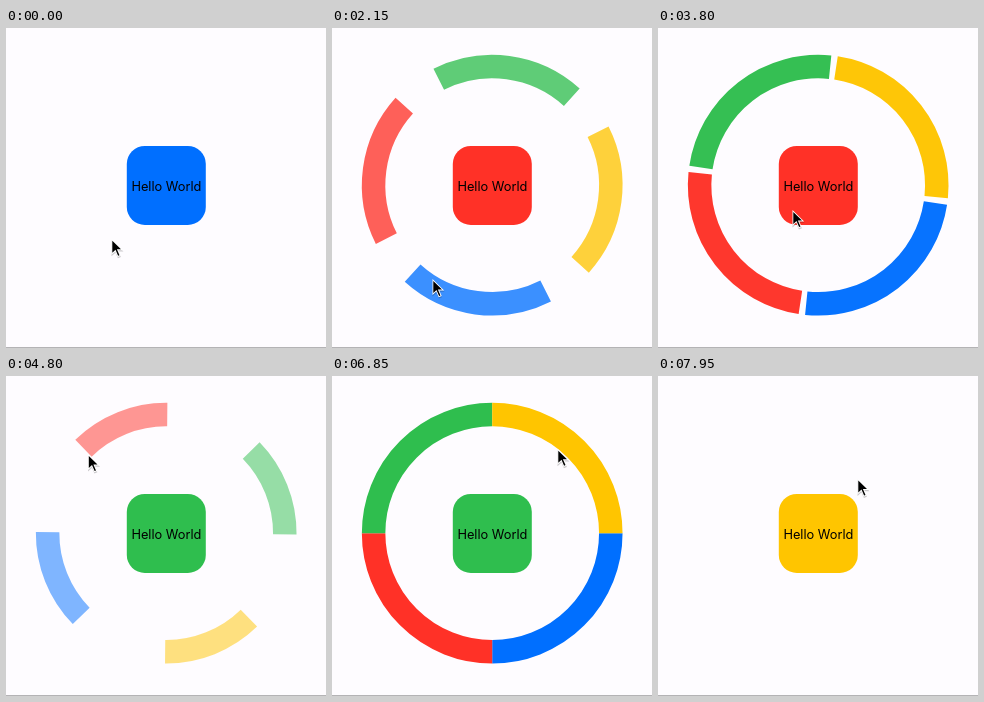
Animation of 320x320 px, one loop 8 s. Source, as an HTML page:

```html
<!DOCTYPE html>
<html lang="en">
<head>
<meta charset="utf-8">
<title>Radial colour menu</title>
<style>
  html, body { margin: 0; width: 100%; height: 100%; overflow: hidden; background: #fefcff; }
  svg { display: block; width: 100%; height: 100%; }
  text { font: 12.8px Inter, "Liberation Sans", sans-serif; text-anchor: middle; }
</style>
</head>
<body>
<svg viewBox="0 0 320 320">
  <rect y="319" width="320" height="1" fill="#b4b3b5"/>
  <g id="ring" transform="translate(160.2 157.2)" fill="none" stroke-width="23.5"></g>
  <rect id="box" x="120.8" y="117.9" width="79" height="79" rx="18"/>
  <text x="160.4" y="162.8">Hello World</text>
  <g id="cursor">
    <path d="M0 1V17.5L3.9 14 6.4 19.5 9.4 18.2 7 12.7H12Z" opacity=".2"/>
    <path d="M0 0V16L3.7 12.6 6.2 18.2 9.2 16.9 6.8 11.5H11.7Z" fill="#fff"/>
    <path d="M.8 2V14L4 11 6.6 17 8 16.4 5.4 10.5H9.5Z"/>
  </g>
</svg>
<script>
const LOOP = 8000, DURATION = 600;  // loop and ring animation, ms
const HOLD = 700, EARLY = 150;      // pointer rests after a click, and arrives before the next
const RADIUS = 118.6;
const BLUE = '#006fff', RED = '#ff3127', GREEN = '#2fbe4e', YELLOW = '#ffc500';

// A click without a colour is on the box and opens the ring; one with a colour picks it and closes.
const ENTRY = { at: -HOLD, x: 105.5, y: 210.8 };
const CLICKS = [
  { at: 450, x: 150, y: 165.7 },
  { at: 1950, x: 100.5, y: 251, color: RED },
  { at: 3277, x: 134.5, y: 182 },
  { at: 4500, x: 82, y: 78, color: GREEN },
  { at: 5692, x: 133, y: 133.5 },
  { at: 6950, x: 225.5, y: 72.7, color: YELLOW },
];
const EXIT = { at: LOOP + 100, x: 199.5, y: 102.5 };
const STOPS = [ENTRY, ...CLICKS, EXIT];

const [ring, box, cursor] = ['ring', 'box', 'cursor'].map(id => document.getElementById(id));
const arcs = [BLUE, RED, GREEN, YELLOW].map(color => {
  const arc = document.createElementNS('http://www.w3.org/2000/svg', 'path');
  arc.setAttribute('d', `M${RADIUS} 0A${RADIUS} ${RADIUS} 0 0 1 0 ${RADIUS}`);
  arc.setAttribute('pathLength', 1);
  arc.setAttribute('stroke', color);
  return ring.appendChild(arc);
});

const mix = (a, b, k) => a + (b - a) * k;

// Eased progress from time a to b: cubic-bezier(.42, 0, .58, 1), solved by bisection
function progress(t, a, b) {
  const x = Math.min(1, Math.max(0, (t - a) / (b - a)));
  if (x === 0 || x === 1) return x;
  let low = 0, high = 1, s;
  for (let i = 0; i < 20; i++) {
    s = (low + high) / 2;
    const bx = 1.26 * s * (1 - s) ** 2 + 1.74 * s * s * (1 - s) + s ** 3;
    if (bx < x) low = s; else high = s;
  }
  return s * s * (3 - 2 * s);
}

function pointerAt(t) {
  let { x, y } = ENTRY;
  for (let i = 1; i < STOPS.length; i++) {
    const k = progress(t, STOPS[i - 1].at + HOLD, STOPS[i].at - EARLY);
    x = mix(x, STOPS[i].x, k);
    y = mix(y, STOPS[i].y, k);
  }
  return [x, y];
}

function draw(t) {
  let open = 0, current = BLUE;
  for (const { at, color } of CLICKS) {
    open = mix(open, color ? 0 : 1, progress(t, at, at + DURATION));
    if (color && t >= at) current = color;
  }

  ring.setAttribute('opacity', open);
  arcs.forEach((arc, i) => {
    arc.setAttribute('stroke-dasharray', `${open} 2`);
    arc.setAttribute('transform', `rotate(${90 * i + 270 * (1 - open)})`);
  });
  box.setAttribute('fill', current);
  cursor.setAttribute('transform', `translate(${pointerAt(t)})`);
}

const start = performance.now();
function frame() {
  draw((performance.now() - start) % LOOP);
  requestAnimationFrame(frame);
}
frame();
</script>
</body>
</html>
```
